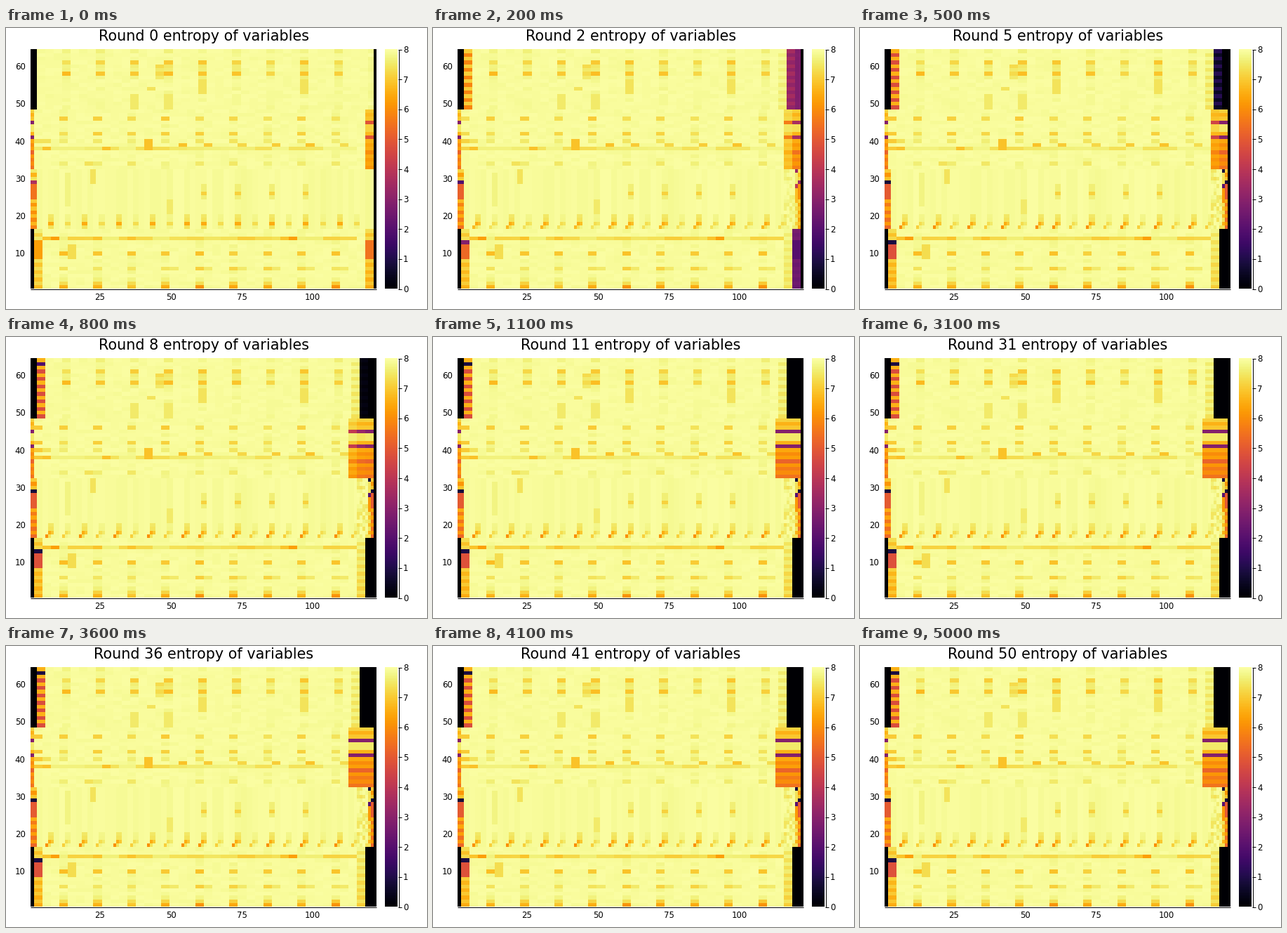
A matplotlib script for the animation above (5100 ms loop, 600 by 400 pixels).

```python
import numpy as np
import matplotlib
import matplotlib.pyplot as plt
from matplotlib.animation import FuncAnimation

W, H = 600, 400
ROWS, COLS, ROUNDS = 64, 122, 51
LEFT, TOP, WIDE, TALL = 35, 30, 493, 341
NUDGE = 0.48  # cell edges round up to the next pixel
PT = 72 / 100

matplotlib.rcParams["font.family"] = "DejaVu Sans"
rng = np.random.default_rng(7)
STEP = np.arange(16)  # rows of a band, from its top down


def block(grid, start, k, row, value):
    """Fill the k-th three-column block of a band starting at `start`."""
    c = start - 1 + 3 * k
    grid[row - 1, c:c + 3] = value


def band(grid, col, width, top, values):
    """Fill 16 rows downwards from `top`."""
    grid[top - 16:top, col - 1:col - 1 + width] = values[::-1, None]


def marks(grid, start, row, strength, first=3):
    """Warm spots on every fourth block of a row."""
    for k in range(first, 38, 4):
        block(grid, start, k, row, 8 - strength * rng.uniform(0.7, 1.3))


def dashes(grid, start, row, faint):
    """A broken line whose dashes are two blocks long."""
    for k in range(0, 38, 2):
        value = 8 - faint * rng.uniform(0.4, 1.2)
        block(grid, start, k, row, value)
        block(grid, start, k + 1, row, value)


def ramp(top, bottom, spread=0.0):
    """Values drifting down a band, alternating by `spread`."""
    return np.linspace(top, bottom, 16) + spread * (-1.0) ** STEP


def background():
    grid = np.full((ROWS, COLS), 7.95)
    for low, start in ((0, 2), (32, 2), (48, 3)):
        for k in range(40):
            depth = 0.2 if k % 4 == 3 else 0.1
            for row in range(low + 1, low + 17):
                block(grid, start, k, row, 7.96 - depth * rng.random())
    for c in range(0, COLS, 2):
        grid[16:32, c:c + 2] = 7.97 - 0.14 * rng.random()
    return grid


def draw_top(g):
    for row, strength in ((64, 0.3), (61, 0.9), (60, 0.4), (59, 0.35),
                          (58, 1.0), (57, 0.3)):
        marks(g, 3, row, strength)
    for k in (11, 15):
        for row in range(49, 53):
            block(g, 3, k, row, 7.5)
    for k in (19, 31):
        for row in range(53, 57):
            block(g, 3, k, row, 7.4)
    for row in range(57, 61):
        block(g, 3, 14, row, 7.5 - 0.25 * (row % 2 == 0))
    block(g, 3, 13, 54, 7.4)


def draw_upper(g):
    dashes(g, 2, 38, 0.6)
    for row, strength in ((46, 0.8), (42, 0.8), (40, 0.5), (34, 0.4)):
        marks(g, 2, row, strength)
    marks(g, 2, 39, 0.9, first=20)
    for k, row in ((1, 38), (8, 38), (13, 38), (13, 39), (13, 40), (17, 39)):
        block(g, 2, k, row, 6.85)
    for k, row in ((0, 40), (1, 40), (6, 34)):
        block(g, 2, k, row, 7.4)


def spots():
    """Column and strength of the spots along the lower band."""
    for i in range(19):
        yield 7 + 6 * i, 1.5 if i % 2 == (i > 8) else 0.7


def draw_lower(g):
    for col, strength in spots():
        for row, part in ((20, 0.35), (19, 0.4), (18, 1.0), (17, 0.4)):
            g[row - 1, col - 1:col + 1] = 8 - strength * part
    g[20:24, 48:50] = 7.5
    g[22:31, 12:14] = 7.7
    g[28:32, 21:23] = 7.4
    for col in range(61, 98, 12):
        g[24:28, col - 1:col + 1] = 7.6
        g[25, col - 1:col + 1] = 7.1


def draw_bottom(g):
    dashes(g, 2, 14, 0.8)
    for row, strength in ((10, 1.0), (6, 0.75), (3, 0.3), (2, 0.8),
                          (1, 1.2)):
        marks(g, 2, row, strength)
    for k in range(16, 39, 4):
        block(g, 2, k, 6, 7.5)
    for k in (2, 30):
        block(g, 2, k, 14, 6.3)
    for k in (1, 7, 11, 29):
        block(g, 2, k, 14, 6.9)
    for k in (19, 35):
        block(g, 2, k, 1, 6.1)
    for row in range(9, 13):
        block(g, 2, 4, row, 7.3)


def stripes():
    values = ramp(6.9, 5.7, 0.2)
    values[[3, 7]] = 2.9
    values[[4, 5]] = 7.5
    values[11] = 5.2
    return values


def lower_edge(dark):
    values = np.where((STEP > 3) & (STEP < 8), 5.0, ramp(6.6, 5.7, 0.4))
    values[3] = dark
    return values


def foot_edge(core):
    """Warm in rows 9 to 13, fading above and below."""
    values = ramp(7.1, 6.7, 0.2)
    values[3:8] = core
    return values


STRIPES = stripes()
HEAD = np.where(STEP % 2 == 0, 6.6, 4.7)


def first_state():
    g = background()
    for draw in (draw_top, draw_upper, draw_lower, draw_bottom):
        draw(g)
    band(g, 119, 3, 48, 0.5 * STRIPES + 3.4)
    band(g, 119, 3, 16, foot_edge(5.5))
    band(g, 2, 3, 16, foot_edge(6.0) + 0.3)
    band(g, 1, 2, 32, lower_edge(3.2) + 0.5)
    band(g, 1, 1, 48, STRIPES)
    g[48:, :2] = 0
    g[:16, 0] = 0
    g[:, -1] = 0
    return g


def middle_state(first):
    g = first.copy()
    band(g, 3, 3, 64, HEAD)
    band(g, 114, 3, 64, ramp(7.7, 7.5, 0.15))
    band(g, 117, 3, 64, ramp(0.8, 0.8, 0.3))
    g[48:, 119:] = 0
    band(g, 116, 3, 48, 0.6 * STRIPES + 2.7)
    band(g, 119, 3, 48, STRIPES)
    for row in (46, 42, 40, 38):
        block(g, 2, 0, row, 7.0)
    g[16:32, 115:119] = 7.95 - 0.6 * rng.random((16, 4)) ** 2
    edge = lower_edge(0.8)
    band(g, 1, 2, 32, edge)
    band(g, 120, 1, 32, np.minimum(np.roll(edge, 1) + 1.2, 7.4))
    band(g, 121, 1, 32, edge)
    g[31, 119] = 0.8
    for col, strength in spots():
        g[16, col - 2] = 8 - 1.3 * strength
        g[16, col] = 7.85
        g[17, col] = 8 - 0.7 * strength
    foot = foot_edge(4.8)
    foot[3] = 0.9
    band(g, 2, 3, 16, foot)
    band(g, 116, 3, 16, ramp(7.6, 7.2, 0.15))
    g[:16, 118:] = 0
    return g


def last_state(middle):
    g = middle.copy()
    block(g, 3, 0, 63, 0.9)
    g[48:, 116:] = 0
    band(g, 113, 9, 48, STRIPES)
    return g


FIRST = first_state()
MIDDLE = middle_state(FIRST)
LAST = last_state(MIDDLE)


def ease(x):
    return 1 - (1 - np.clip(x, 0, 1)) ** 2


def entropy(n):
    return (FIRST + (MIDDLE - FIRST) * ease(n / 5)
            + (LAST - MIDDLE) * ease((n - 5) / 6))


def col_x(col):
    return LEFT + col * WIDE / COLS


def row_y(row):
    return TOP + TALL - row * TALL / ROWS


# Everything is drawn in pixels, with y pointing down.
fig = plt.figure(figsize=(W / 100, H / 100), dpi=100, facecolor="white")
page = fig.add_axes([0, 0, 1, 1])
page.axis("off")


def mesh(xs, ys, values):
    return page.pcolormesh(xs, ys, values, cmap="inferno", vmin=0, vmax=8,
                           antialiased=False)


def line(xs, ys):
    page.plot(xs, ys, color="black", lw=PT, solid_capstyle="butt")


def label(x, y, text, align):
    page.text(x, y, text, ha=align, va="baseline", fontsize=11.8 * PT)


heat = mesh(col_x(np.arange(COLS + 1)) + NUDGE,
            row_y(np.arange(ROWS + 1)) + NUDGE, FIRST)
mesh([540, 558], np.linspace(TOP + TALL, TOP, 257),
     np.linspace(0, 8, 256)[:, None])

line([LEFT, LEFT + WIDE], [371.5, 371.5])
line([559.5, 559.5], [30.5, 371.5])
for tick in range(25, 101, 25):
    label(col_x(tick - 0.5), 387, str(tick), "center")
for tick in range(10, 61, 10):
    label(27.5, row_y(tick - 0.5) + 5, str(tick), "right")
for tick in range(9):
    y = 371.5 - tick * TALL / 8
    line([559, 564], [y, y])
    label(566, y + 4.5, str(tick), "left")
title = page.text(281.7, 18, "", ha="center", va="baseline",
                  fontsize=20.8 * PT)
page.set_xlim(0, W)
page.set_ylim(H, 0)


def update(n):
    heat.set_array(entropy(n))
    title.set_text(f"Round {n} entropy of variables")
    return heat, title


anim = FuncAnimation(fig, update, frames=ROUNDS, interval=100, repeat=True,
                     repeat_delay=0, blit=False)
plt.show()
```
